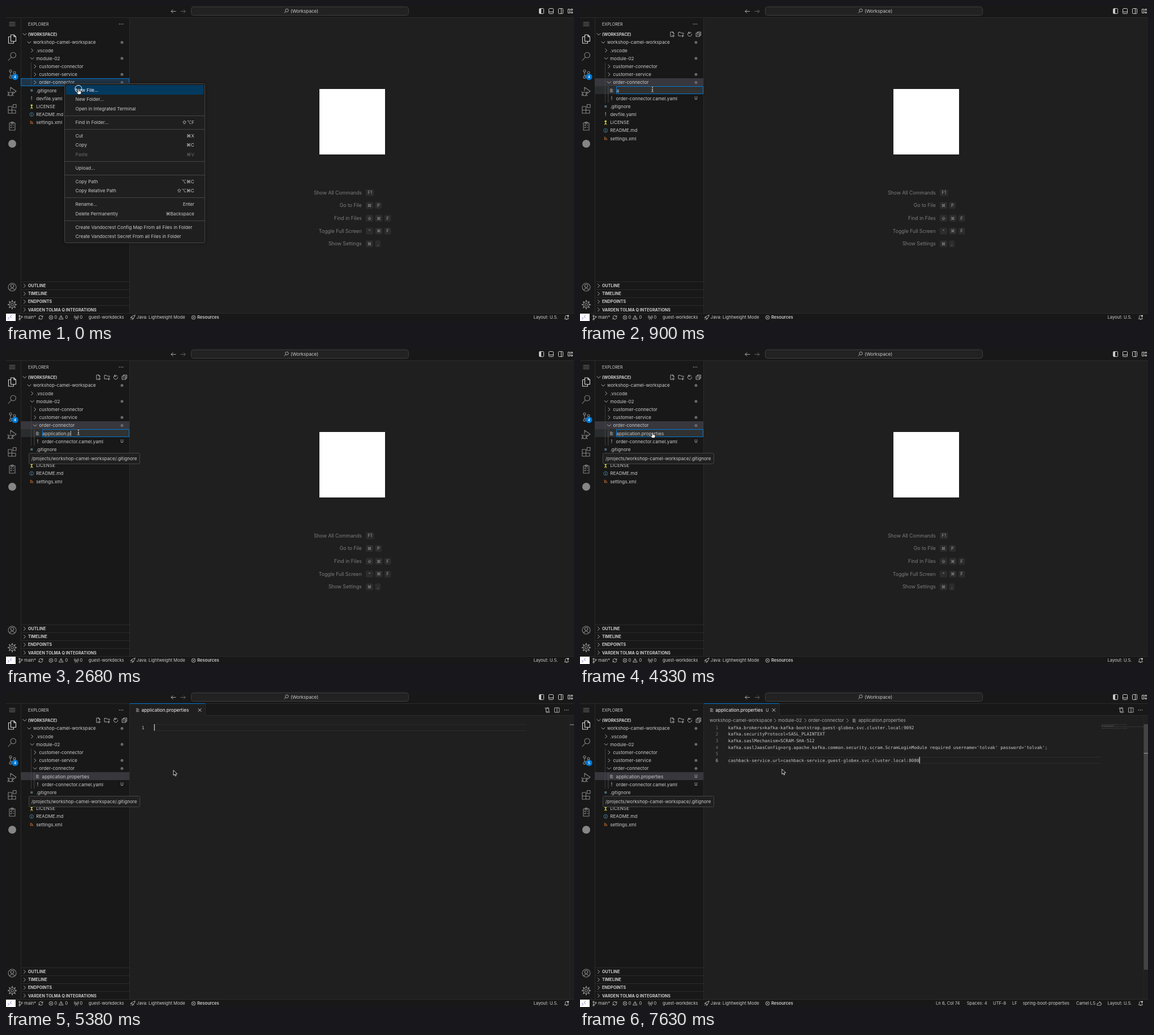
Animation of 1004x558 px, one loop 8 s. Source, as an HTML page with a canvas:

```html
<!DOCTYPE html>
<html lang="en">
<head>
<meta charset="utf-8">
<title>Creating a properties file</title>
<style>
html, body { margin: 0; width: 100%; height: 100%; overflow: hidden; background: #1f1f1f; }
canvas { display: block; width: 1004px; height: 558px; }
</style>
</head>
<body>
<canvas id="stage"></canvas>
<script>
const W = 1004, H = 558, LOOP = 8000;
const SANS = 'Inter, "Noto Sans", "DejaVu Sans", sans-serif';
const MONO = '"DejaVu Sans Mono", "Liberation Mono", monospace';
const BLUE = '#0078d4', FG = '#cccccc', DIM = '#868686', EDGE = '#2b2b2b', SIDE = '#181818', BG = '#1f1f1f';
const canvas = document.getElementById('stage');
const c = canvas.getContext('2d');
const ratio = window.devicePixelRatio || 1;
canvas.width = W * ratio;
canvas.height = H * ratio;

const FILE = 'application.properties';
const CODE = [
  'kafka.brokers=kafka-kafka-bootstrap.guest-globex.svc.cluster.local:9092',
  'kafka.securityProtocol=SASL_PLAINTEXT',
  'kafka.saslMechanism=SCRAM-SHA-512',
  "kafka.saslJaasConfig=org.apache.kafka.common.security.scram.ScramLoginModule required username='tolvak' password='tolvak';",
  '',
  'cashback-service.url=cashback-service.guest-globex.svc.cluster.local:8080'
];

// [time, number of letters typed]
const TYPING = [
  [450, 0], [900, 1], [1050, 2], [1200, 3], [1350, 4], [1490, 5], [1640, 6], [1790, 7], [1940, 8],
  [2090, 9], [2240, 10], [2380, 12], [2680, 13], [2980, 14], [3130, 15], [3280, 16], [3430, 18],
  [3730, 19], [3880, 20], [4030, 22]
];
// [time, shape, x, y]
const POINTER = [
  [0, 'hand', 128, 147], [450, 'beam', 128, 147.5], [4330, 'hand', 128, 148], [4930, 'hand', 150, 147],
  [5080, 'hand', 173, 145.5], [5230, 'arrow', 226, 143], [5380, 'arrow', 296, 139],
  [5530, 'beam', 358, 137], [5980, 'none', 0, 0], [6280, 'arrow', 357, 137]
];

function at(keys, t) {
  let found = keys[0];
  for (const k of keys) if (k[0] <= t) found = k;
  return found;
}

function rect(x, y, w, h, fill, stroke, r = 0) {
  c.beginPath();
  c.roundRect(x, y, w, h, r);
  if (fill) { c.fillStyle = fill; c.fill(); }
  if (stroke) { c.strokeStyle = stroke; c.lineWidth = 1; c.stroke(); }
}

function text(s, x, y, { size = 8.15, color = FG, weight = 400, align = 'left', font = SANS } = {}) {
  c.font = `${weight} ${size}px ${font}`;
  c.textAlign = align;
  c.fillStyle = color;
  c.fillText(s, x, y + size * 0.36);
}

function path(d, x, y, { color = FG, width = 0.8, fill } = {}) {
  c.save();
  c.translate(x, y);
  const p = new Path2D(d);
  c.lineJoin = c.lineCap = 'round';
  if (fill) { c.fillStyle = fill; c.fill(p); }
  if (color) { c.strokeStyle = color; c.lineWidth = width; c.stroke(p); }
  c.restore();
}

function disc(x, y, r, fill, stroke, width = 0.8) {
  c.beginPath();
  c.arc(x, y, r, 0, 7);
  if (fill) { c.fillStyle = fill; c.fill(); }
  if (stroke) { c.strokeStyle = stroke; c.lineWidth = width; c.stroke(); }
}

const hline = (x1, x2, y, color = EDGE) => rect(x1, y, x2 - x1, 1, color);
const chevron = (x, y, open, color = FG) => path(open ? 'M-3-1.5L0 1.5L3-1.5' : 'M-1.5-3L1.5 0L-1.5 3', x, y, { color });
const listIcon = (x, y) => path('M-2.7-2.5h3.5M-2.7-.8h5M-2.7.9h3.5M-2.7 2.6h5', x, y, { width: 0.7 });
const dots = (x, y) => [-3, 0, 3].forEach(d => disc(x + d, y, 0.7, FG));
const sync = (x, y) => path('M-3.4-.4A3.4 3.4 0 0 1 3-1.5M3.4.4A3.4 3.4 0 0 1-3 1.5M3.4-3.2v2h-2M-3.4 3.2v-2h2', x, y);

function titleBar() {
  rect(0, 0, W, 20, SIDE);
  hline(0, W, 20);
  path('M4 0h-8M-1-3L-4 0L-1 3', 296, 9.5);
  path('M-4 0h8M1-3L4 0L1 3', 313, 9.5, { color: '#777' });
  rect(327.5, 1.5, 384, 15, '#222222', '#3d3d3d', 4);
  disc(496.5, 7.8, 2.7, null, FG);
  path('M-2 2L-4.5 4.5', 496.5, 7.8);
  text('(Workspace)', 503, 9);
  for (const x of [942.5, 959.5, 976.5]) rect(x, 4.5, 8, 9, null, FG, 1);
  rect(943, 5, 3, 8, FG);
  hline(960, 967, 10, FG);
  rect(981, 5, 1, 8, FG);
  rect(993.5, 5.5, 3, 7, null, FG);
  rect(998.5, 5.5, 3, 2, null, FG);
  rect(998.5, 10.5, 3, 2, null, FG);
}

function badge(x, y, label) {
  disc(x, y, 5.6, BLUE);
  if (label) text(label, x, y, { size: 6, weight: 600, color: '#fff', align: 'center' });
  else {
    disc(x, y, 3, null, '#fff', 0.8);
    path('M0-2V0H1.5', x, y, { color: '#fff' });
  }
}

function activityBar(t) {
  const o = { color: DIM, width: 1.1 };
  rect(0, 21, 26, 524, SIDE);
  rect(26, 21, 1, 524, EDGE);
  path('M-5-3H5M-5 0H5M-5 3H5', 11, 32, { color: DIM, width: 0.9 });
  path('M-2.5-7.5H3L6.5-4V4H-2.5ZM3-7.5V-4H6.5M-2.5-4H-6.5V7.5H2.5V4', 11, 58.5, { color: '#d7d7d7', width: 1.1 });
  path('M-2 2L-7 7.5M6.5-2A4.7 4.7 0 1 1-3-2A4.7 4.7 0 1 1 6.5-2', 11, 89, o);
  disc(8, 115, 2, null, DIM, 1.1);
  disc(15, 118, 2, null, DIM, 1.1);
  disc(8, 126, 2, null, DIM, 1.1);
  path('M-3-3V4M4 0C4 3-1 2-3 4', 11, 120, o);
  path('M-3-1V-7L7 0L0 5M-6 2H0V5A3 3 0 0 1-6 5ZM-8 1L-6 3M-8 5H-6M-8 8L-6 6M2 1L0 3M2 8L0 6', 11, 151, o);
  path('M-7-4H-.5V2.5H-7ZM-7 2.5H6V8H-7ZM-.5 2.5V8M1.5-7.5H7V-2H1.5Z', 11, 182, o);
  path('M-5-6H5V7H-5ZM-2-7.5H2V-5H-2ZM-3-2L-2-1L-.5-3M-3 2L-2 3L-.5 1M1.5-2H3M1.5 2H3', 11, 213, o);
  disc(11, 244, 7, '#868686');
  disc(11, 498, 7, null, DIM, 1.1);
  disc(11, 496, 2.7, null, DIM, 1.1);
  path('M-4.5 5Q0-1 4.5 5', 11, 498, o);
  disc(11, 529, 2.2, null, DIM, 1.1);
  disc(11, 529, 5.2, null, DIM, 1.1);
  for (let i = 0; i < 8; i++) {
    const a = i * Math.PI / 4, x = Math.cos(a), y = Math.sin(a);
    path(`M${x * 5.4} ${y * 5.4}L${x * 7.2} ${y * 7.2}`, 11, 529, { color: DIM, width: 2 });
  }
  if (t >= 4930 && t < 5380) badge(16, 63.5);
  badge(16, 125.5, t < 6280 ? '4' : '5');
}

const fileIcons = {
  git: (x, y) => rect(x - 2, y - 2, 4, 4, '#4d6873'),
  yaml: (x, y) => text('!', x, y, { size: 9, weight: 700, color: '#a074c4', align: 'center' }),
  license: (x, y) => {
    disc(x, y - 2, 1.8, '#cbcb41');
    path('M0-1V1L-1.5 3.6M0 1L1.5 3.6', x, y, { color: '#cbcb41', width: 1.2 });
  },
  info: (x, y) => {
    disc(x, y, 3.4, null, '#519aba', 0.7);
    path('M0-.3V1.8M0-1.8V-1.7', x, y, { color: '#519aba', width: 0.9 });
  },
  feed: (x, y) => {
    disc(x - 1.7, y + 1.7, 0.8, '#e37933');
    path('M-2.3-.2A2.3 2.3 0 0 1 .2 2.3M-2.3-2.3A4.5 4.5 0 0 1 2.3 2.3', x, y, { color: '#e37933', width: 1 });
  },
  list: listIcon
};

function treeRows(t) {
  const folder = (label, level, open, dot) => ({ label, level, folder: true, open, dot });
  const file = (label, level, icon, mark) => ({ label, level, icon, mark });
  const open = t >= 300;
  const rows = [
    folder('workshop-camel-workspace', 0, true, true),
    folder('.vscode', 1, false),
    folder('module-02', 1, true, true),
    folder('customer-connector', 2, false),
    folder('customer-service', 2, false, true),
    folder('order-connector', 2, open, true)
  ];
  if (t >= 450 && t < 4480) rows.push({ ...file('', 3, 'list'), input: true });
  if (t >= 5230) rows.push({ ...file(FILE, 3, 'list', t >= 6280 && 'U'), active: true });
  if (open) rows.push(file('order-connector.camel.yaml', 3, 'yaml', 'U'));
  rows.push(file('.gitignore', 1, 'git'), file('devfile.yaml', 1, 'yaml'), file('LICENSE', 1, 'license'),
    file('README.md', 1, 'info'), file('settings.xml', 1, 'feed'));
  return rows;
}

function inputBox(t, y) {
  const top = Math.round(y - 7.1);
  rect(26, top, 192, 14, '#2a2d2e');
  rect(64.5, top + 0.5, 153, 13, '#313131', BLUE);
  const value = FILE.slice(0, at(TYPING, t)[1]);
  text(value, 64.5, y);
  const end = 64.5 + c.measureText(value).width;
  const hidden = t >= 4330 || (t >= 900 && t < 1050);
  if (!hidden) rect(end + 0.2, y - 4.5, 0.8, 9, '#ddd');
}

function rowBack(row, t, y) {
  const top = Math.round(y - 7.1);
  const full = (fill, stroke) => {
    rect(26, top, 192, 14, fill);
    if (stroke) rect(26.5, top + 0.5, 191, 13, null, stroke);
  };
  if (row.label === 'order-connector') {
    if (t < 150) full('#1f3447', BLUE);
    else if (t < 450 || (t >= 4480 && t < 5230)) full('#04395e', BLUE);
    else if (t < 4480) full('#37373d');
  }
  if (row.active) full('#37373d');
  if (t >= 4480 && t < 5230 && row.icon === 'yaml' && row.level === 3) full('#2a2d2e');
}

function sidebar(t) {
  rect(27, 21, 191, 524, SIDE);
  rect(218, 21, 1, 524, EDGE);
  text('EXPLORER', 39, 32, { size: 7.2 });
  dots(203.5, 32);
  chevron(33, 50, true);
  text('(WORKSPACE)', 39, 50, { size: 7.2, weight: 700 });
  if (t >= 150) {
    path('M1-4H-3V4H0M1-4L3-2V0M1-4V-2H3M2 1V5M0 3H4', 163, 50);
    path('M0 3H-4.5V-3.5H-1L0-2H4.5V0M3 1V5M1 3H5', 178.5, 50);
    path('M2.5-2.5A3.6 3.6 0 1 0 3.6 0M-2-4V-1.5H.5', 194, 50);
    path('M-2-2V-4H4V2H2M-4-2H2V4H-4ZM-2.5 1H.5', 209.5, 50);
  }
  if (t >= 4930 && t < 5380) rect(34 + (t - 5080) * 0.05, 41.5, 5, 1.3, BLUE);

  treeRows(t).forEach((row, i) => {
    const y = 64.5 + 14.18 * i;
    rowBack(row, t, y);
    if (row.input) inputBox(t, y);
    if (row.level > 1) rect(44.3, y - 7, 0.7, 14.2, '#4b4b4b');
    if (row.level > 2) rect(49.6, y - 7, 0.7, 14.2, '#606060');
    const x = 48 + row.level * 5.2;
    if (row.folder) chevron(x - 7, y, row.open);
    else fileIcons[row.icon](row.level === 3 ? 56 : 45.3, y);
    text(row.label, x, y);
    if (row.dot) disc(205, y, 2.5, '#686868');
    if (row.mark) text(row.mark, 205, y, { size: 7.4, align: 'center' });
  });

  ['OUTLINE', 'TIMELINE', 'ENDPOINTS', 'VARDEN TOLMA Q INTEGRATIONS'].forEach((s, i) => {
    const y = 495.5 + i * 14.15;
    hline(27, 218, Math.round(y - 7.5));
    chevron(33, y, false);
    text(s, 39, y, { size: 7.2, weight: 700 });
  });
}

function welcome() {
  rect(554, 147, 116, 116, '#ffffff');
  [
    ['Show All Commands', 'F1'], ['Go to File', '⌘', 'P'], ['Find in Files', '⇧', '⌘', 'F'],
    ['Toggle Full Screen', '^', '⌘', 'F'], ['Show Settings', '⌘', ',']
  ].forEach(([label, ...keys], i) => {
    const y = 330.7 + i * 22.65;
    text(label, 628.8, y, { size: 8.7, color: '#7d7d7d', align: 'right' });
    let x = 636;
    for (const k of keys) {
      const w = k === 'F1' ? 14.5 : k === ',' ? 9.5 : /[A-Z]/.test(k) ? 11.5 : 13;
      rect(x, y - 6, w, 12, '#2c2c2c', null, 2);
      text(k, x + w / 2, y, { size: 7.4, color: '#a0a0a0', align: 'center' });
      x += w + 3.5;
    }
  });
}

function editor(t) {
  rect(219, 21, 785, 20, SIDE);
  hline(219, W, 41);
  rect(219, 21, 133, 21, BG);
  rect(352, 21, 1, 20, EDGE);
  hline(219, 352, 20, BLUE);
  listIcon(233, 32);
  text(FILE, 239.5, 32, { color: '#fff' });
  if (t >= 6280) text('U', 331, 32, { size: 7.4, align: 'center' });
  path('M-2.5-2.5L2.5 2.5M2.5-2.5L-2.5 2.5', 342.5, 32, { color: '#fff' });
  disc(954.5, 29, 1.3, null, FG);
  disc(959.5, 35.5, 1.3, null, FG);
  path('M-2.5-1.5V3.5H0M-1 2L.5 3.5L-1 5M2.5 2V-3.5H0M1-5L-.5-3.5L1-2', 957, 32);
  path('M-4-4H4V4H-4ZM0-4V4', 974, 32);
  dots(990.5, 32);
  if (t >= 5680) {
    const o = { color: '#a9a9a9' };
    [['workshop-camel-workspace', 229, 345], ['module-02', 350, 398.5], ['order-connector', 403.5, 473]].forEach(([s, x, cx]) => {
      text(s, x, 50.3, o);
      chevron(cx, 50.5, false, '#a9a9a9');
    });
    listIcon(485, 50.5);
    text(FILE, 492, 50.3, o);
  }

  const pasted = t >= 6580;
  const lines = pasted ? CODE : [''];
  const last = lines.length - 1;
  const mono = { font: MONO, size: 7.69 };
  const lineY = i => 63 + i * 11.61;
  const top = Math.round(lineY(last) - 5.8);
  hline(262, 920, top, '#2c2c2c');
  hline(262, 920, top + 11, '#2c2c2c');
  lines.forEach((s, i) => {
    text(String(i + 1), 244.5, lineY(i), { ...mono, align: 'right', color: i === last ? FG : '#6e7681' });
    text(s, 261.8, lineY(i), mono);
  });
  c.font = `7.69px ${MONO}`;
  const end = 261.8 + c.measureText(lines[last]).width;
  const lit = pasted ? t < 7030 || t >= 7630 : t < 5980 || t >= 6430;
  if (lit) rect(end, top, 1.2, 11.4, '#d0d0d0');

  rect(996, 42, 0.6, 503, '#292929');
  if (pasted) {
    if (t >= 6730) CODE.forEach((s, i) => text(s, 922, 58 + i * 1.3, { font: MONO, size: 1.03, color: '#b0b0b0' }));
    rect(996.5, 57, 7.5, 435, '#434343');
    hline(996.5, W, 108, '#a0a0a0');
  } else hline(996.5, W, 57.5, '#a0a0a0');
}

function statusBar(t) {
  const y = 551.7;
  const label = (s, x, weight = 400) => text(s, x, y, { size: 7.6, weight });
  const cross = x => {
    disc(x, y, 3.4, null, FG);
    path('M-1.4-1.4L1.4 1.4M1.4-1.4L-1.4 1.4', x, y);
  };
  rect(0, 545, W, 13, SIDE);
  hline(0, W, 544);
  rect(0, 545, 17, 13, '#ffffff');
  path('M-3.2-.5L-.7 1.5L-3.2 3.5M3.2-3.5L.7-1.5L3.2.5', 6.5, y, { color: '#6a70c8' });
  disc(24, 549, 1.2, null, FG);
  disc(24, 555, 1.2, null, FG);
  disc(28, 550.5, 1.2, null, FG);
  path('M0-1.5V2M4 0Q4 2 0 2', 24, y);
  label('main*', 32);
  sync(61.5, y);
  cross(79.5);
  label('0', 85.5);
  path('M0-3.3L3.6 3H-3.6ZM0-1V1', 97.5, y);
  label('0', 104.5);
  path('M0-1L-1.8 4M0-1L1.8 4M-1.6-2.6A2.4 2.4 0 0 0-1.6.8M1.6-2.6A2.4 2.4 0 0 1 1.6.8M-3-3.6A4 4 0 0 0-3 1.8M3-3.6A4 4 0 0 1 3 1.8', 124.5, y, { width: 0.7 });
  label('0', 130.5);
  label('guest-workdecks', 146);
  path('M4-4Q0-4-2 0L0 2Q4 0 4-4ZM-2 0L-4 .5L-1.5-2M0 2L-.5 4L2 1.5M-2 2L-3.5 3.5', 224, y);
  label('Java: Lightweight Mode', 230.8);
  if (t >= 4930 && t < 5380) {
    sync(331.5, y);
    label('Creating ' + FILE, 338);
    cross(465.5);
    label('Resources', 472, 600);
  } else {
    cross(331.5);
    label('Resources', 338, 600);
  }
  if (t >= 5680) {
    if (t >= 6580) label('Ln 6, Col 74', 629);
    else label('Ln 1, Col 1', 634);
    label('Spaces: 4', 683.7);
    label('UTF-8', 730);
    label('LF', 764);
    label('spring-boot-properties', 782.7);
    label('Camel LS', 877);
    path('M-3.5 0H-1.5L.5-3.5Q2-3.5 1.2-.7H3.7L2.8 3.3H-3.5Z', 918, y);
  }
  label('Layout: U.S.', 932.5);
  path('M-3.5 2.5H3.5L2.5 1V-1A2.5 2.5 0 0 0-2.5-1V1ZM-.8 3.8H.8', 991, y);
  disc(993.5, 548.8, 1.5, FG);
}

function contextMenu() {
  c.save();
  c.shadowColor = 'rgba(0,0,0,.45)';
  c.shadowBlur = 6;
  rect(103.5, 137.5, 248, 282, BG, null, 3);
  c.restore();
  rect(103.5, 137.5, 248, 282, null, '#454545', 3);
  rect(106, 140, 243, 17, '#04395e', null, 2);
  [
    ['New File...', 148.7], ['New Folder...', 165.5], ['Open in Integrated Terminal', 182.2],
    ['Find in Folder...', 206, '⇧⌥F'], ['Cut', 229.8, '⌘X'], ['Copy', 246.5, '⌘C'], ['Paste', 263.3, '⌘V'],
    ['Upload...', 287], ['Copy Path', 310.8, '⌥⌘C'], ['Copy Relative Path', 327.5, '⇧⌥⌘C'],
    ['Rename...', 351.3, 'Enter'], ['Delete Permanently', 368, '⌘Backspace'],
    ['Create Vandocrest Config Map From all Files in Folder', 391.8],
    ['Create Vandocrest Secret From all Files in Folder', 408.5]
  ].forEach(([s, y, key]) => {
    const color = s === 'Paste' ? '#6c6c6c' : s === 'New File...' ? '#fff' : FG;
    text(s, 122.8, y, { color });
    if (key) text(key, 332.8, y, { color, align: 'right' });
  });
  [194, 218, 275, 299, 339, 380].forEach(y => hline(104, 351, y, '#454545'));
}

function tooltip() {
  rect(40.5, 184.5, 196, 19, '#202020', '#454545', 2);
  text('/projects/workshop-camel-workspace/.gitignore', 45, 194.3);
}

function pointer(t) {
  const [, shape, x, y] = at(POINTER, t);
  if (t < 150) disc(128, 146.5, 6, null, '#ffffff', 1);
  if (shape === 'hand') {
    path('M-1 0Q0-1 1 0V3.5L4.5 4.2Q5.5 4.6 5 6.5L4 9.5H-.5L-3.5 6Q-3.8 4.5-1 6Z', x, y, { color: '#111', width: 0.8, fill: '#fff' });
  } else if (shape === 'beam') {
    const d = 'M-2-5Q0-5 0-3.5Q0-5 2-5M0-3.5V3.5M-2 5Q0 5 0 3.5Q0 5 2 5M-1 1H1';
    path(d, x, y, { color: '#000', width: 2 });
    path(d, x, y, { color: '#eee', width: 0.9 });
  } else if (shape === 'arrow') {
    path('M0 0V8.6L2 6.7L3.4 10L4.9 9.3L3.5 6.2H6.2Z', x, y, { color: '#eee', width: 0.9, fill: '#000' });
  }
}

function draw(t) {
  c.setTransform(ratio, 0, 0, ratio, 0, 0);
  rect(0, 0, W, H, BG);
  titleBar();
  activityBar(t);
  sidebar(t);
  if (t < 5380) welcome();
  else editor(t);
  statusBar(t);
  if (t < 150) contextMenu();
  if (t >= 1350) tooltip();
  pointer(t);
}

const start = performance.now();
function tick() {
  draw((performance.now() - start) % LOOP);
  requestAnimationFrame(tick);
}
tick();
</script>
</body>
</html>
```
